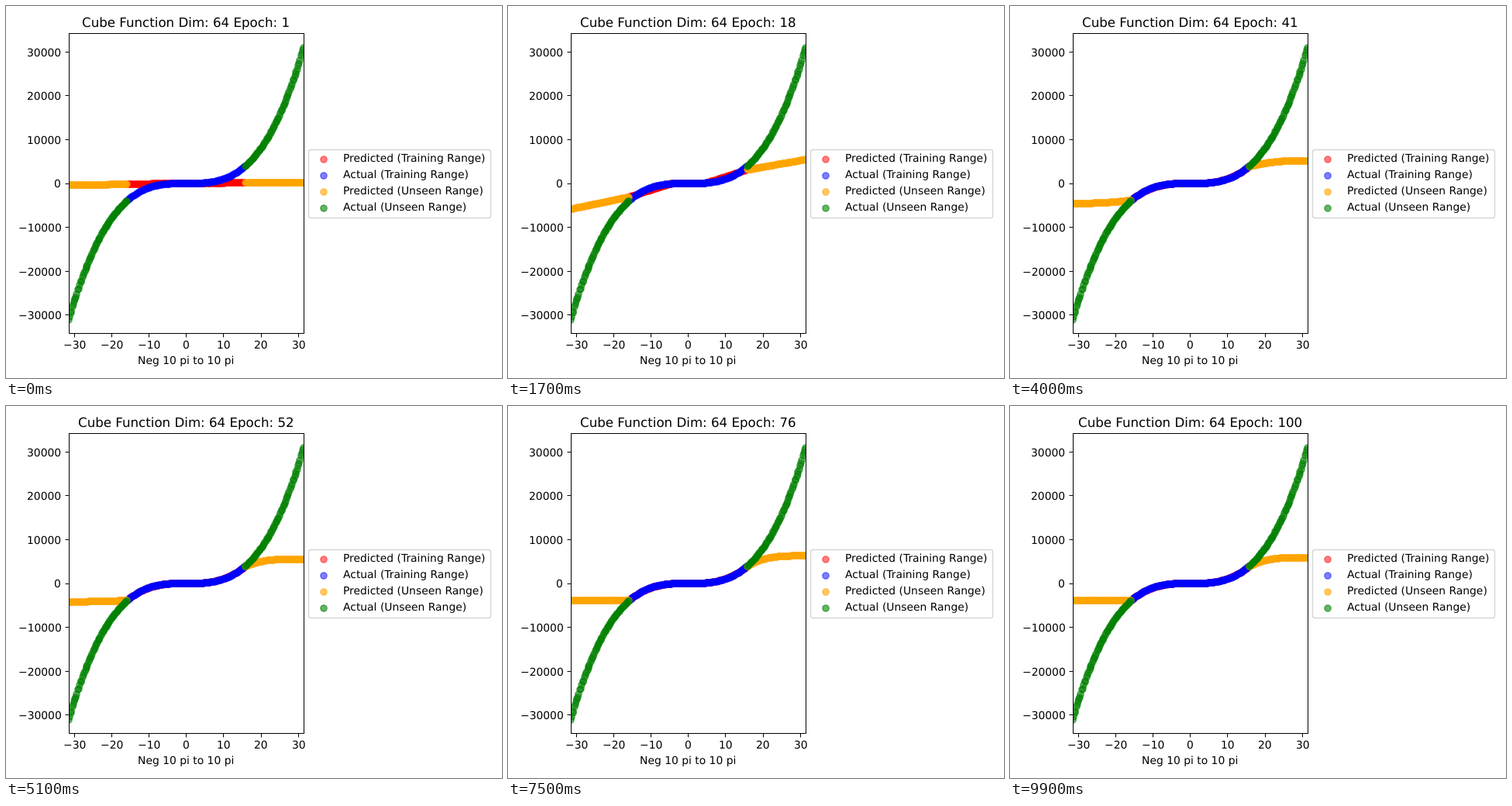
Animation of 640x480 px, one loop 10 s. Source, as an HTML page with a canvas:

```html
<!DOCTYPE html>
<html lang="en">
<head>
<meta charset="utf-8">
<title>Cube function fit</title>
<style>
  html, body { margin: 0; width: 640px; height: 480px; overflow: hidden; background: #fff; }
  canvas, svg { position: absolute; left: 0; top: 0; }
  text {
    font: 13.889px "DejaVu Sans", Verdana, sans-serif;
    text-rendering: geometricPrecision;
  }
  .title { font-size: 16.667px; }
  .axis { fill: none; stroke: #000; }
  .box { fill: #fff; stroke: #ccc; stroke-opacity: .8; stroke-width: 1.39; }
</style>
</head>
<body>
<canvas id="plot" width="640" height="480"></canvas>
<svg id="chart" width="640" height="480">
  <rect class="axis" x="81.5" y="35.5" width="303" height="387"/>
  <rect class="box" x="390.5" y="185.5" width="235" height="88" rx="2.8"/>
</svg>
<script>
const LIMIT = 10 * Math.PI, TRAINED = 5 * Math.PI;
const DOT = 4.17, EDGE = 1.39;
const chart = document.getElementById('chart');
const ctx = document.getElementById('plot').getContext('2d');

const px = x => 232.75 + x * 4.82;
const py = v => 229.05 - v * 0.00566;
const mix = (a, b, t) => a + (b - a) * t;
const clamp = t => Math.min(1, Math.max(0, t));
const cube = x => x ** 3;

// Height of the prediction at both ends of the axis: epoch, left, right.
const ENDS = [
  [1, -400, 200], [12, -5600, 5200], [18, -5850, 5450], [31, -4900, 4900],
  [52, -4150, 5550], [66, -3400, 5750], [85, -4150, 6800], [100, -3850, 5900]
];

function endsAt(epoch) {
  const i = Math.max(1, ENDS.findIndex(e => e[0] >= epoch));
  const a = ENDS[i - 1], b = ENDS[i];
  const t = (epoch - a[0]) / (b[0] - a[0]);
  return [mix(a[1], b[1], t), mix(a[2], b[2], t)];
}

// Inside the training range a flat-centred hinge turns into the cube;
// outside it the curve levels off, more sharply in later epochs.
function predictor(epoch) {
  const [left, right] = endsAt(epoch);
  const growth = mix(.06, 1, clamp((epoch - 1) / 11));
  const fit = .9 * clamp((epoch - 18) / 13);
  const bend = mix(1, 3.5, clamp((epoch - 26) / 24));
  const hinge = x => Math.sign(x) * Math.max(0, Math.abs(x) - 4.5) * 275;
  const inner = x => growth * mix(hinge(x), cube(x), fit);
  return x => {
    const beyond = (Math.abs(x) - TRAINED) / TRAINED;
    if (beyond <= 0) return inner(x);
    const edge = inner(Math.sign(x) * TRAINED);
    return mix(edge, x < 0 ? left : right, 1 - (1 - clamp(beyond)) ** bend);
  };
}

// Slightly uneven sample positions.
let seed = 7;
const random = () => (seed = seed * 16807 % 2147483647) / 2147483647;
function samples(from, to) {
  const n = Math.round((to - from) / .24);
  return Array.from({ length: n + 1 }, (_, i) => {
    const jitter = i % n ? (random() - .5) * .8 : 0;
    return mix(from, to, (i + jitter) / n);
  });
}
const seen = samples(-TRAINED, TRAINED);
const unseen = [...samples(-LIMIT, -15.85), ...samples(15.85, LIMIT)];

const SERIES = [
  ['Predicted (Training Range)', '#f00', .5, seen, true],
  ['Actual (Training Range)', '#00f', .5, seen, false],
  ['Predicted (Unseen Range)', '#ffa500', .6, unseen, true],
  ['Actual (Unseen Range)', '#008000', .6, unseen, false]
];

function add(tag, attrs) {
  const el = document.createElementNS('http://www.w3.org/2000/svg', tag);
  for (const k in attrs) el.setAttribute(k, attrs[k]);
  return chart.appendChild(el);
}

// Text starts on a whole pixel; align is 0 for left, .5 for centre, 1 for right.
function setText(el, text, x, align) {
  el.textContent = text;
  el.setAttribute('x', Math.round(x - align * el.getComputedTextLength()));
}
const addText = (text, x, y, align) => setText(add('text', { y: Math.round(y) }), text, x, align);

const label = n => String(n).replace('-', '\u2212');
for (let i = -3; i <= 3; i++) {
  const x = px(i * 10), y = py(i * 10000);
  add('path', {
    class: 'axis',
    d: `M${Math.floor(x) + .5} 423v4.5M81 ${Math.floor(y) + .5}h-4.5`
  });
  addText(label(i * 10), x, 442, .5);
  addText(label(i * 10000), 71.3, y + 5.3, 1);
}
addText('Neg 10 pi to 10 pi', 232.5, 462, .5);
const title = add('text', { class: 'title', y: 27 });

SERIES.forEach(([name, color, alpha], i) => {
  add('circle', {
    cx: 410, cy: 198 + i * 21, r: DOT, fill: color, stroke: color,
    'fill-opacity': alpha, 'stroke-opacity': alpha, 'stroke-width': EDGE
  });
  addText(name, 435, 201 + i * 21, 0);
});

function draw(epoch) {
  const predict = predictor(epoch);
  setText(title, `Cube Function Dim: 64 Epoch: ${epoch}`, 232.3, .5);
  ctx.clearRect(0, 0, 640, 480);
  ctx.save();
  ctx.beginPath();
  ctx.rect(81, 35, 304, 388);
  ctx.clip();
  ctx.lineWidth = EDGE;
  for (const [, color, alpha, xs, predicted] of SERIES) {
    const curve = predicted ? predict : cube;
    ctx.globalAlpha = alpha;
    ctx.fillStyle = ctx.strokeStyle = color;
    for (const x of xs) {
      ctx.beginPath();
      ctx.arc(Math.round(px(x)), Math.round(py(curve(x))), DOT, 0, 2 * Math.PI);
      ctx.fill();
      ctx.stroke();
    }
  }
  ctx.restore();
}

const start = performance.now();
let shown = 0;
function tick(now) {
  const epoch = Math.floor(Math.max(0, now - start) % 10000 / 100) + 1;
  if (epoch !== shown) draw(shown = epoch);
  requestAnimationFrame(tick);
}
tick(start);
</script>
</body>
</html>
```
